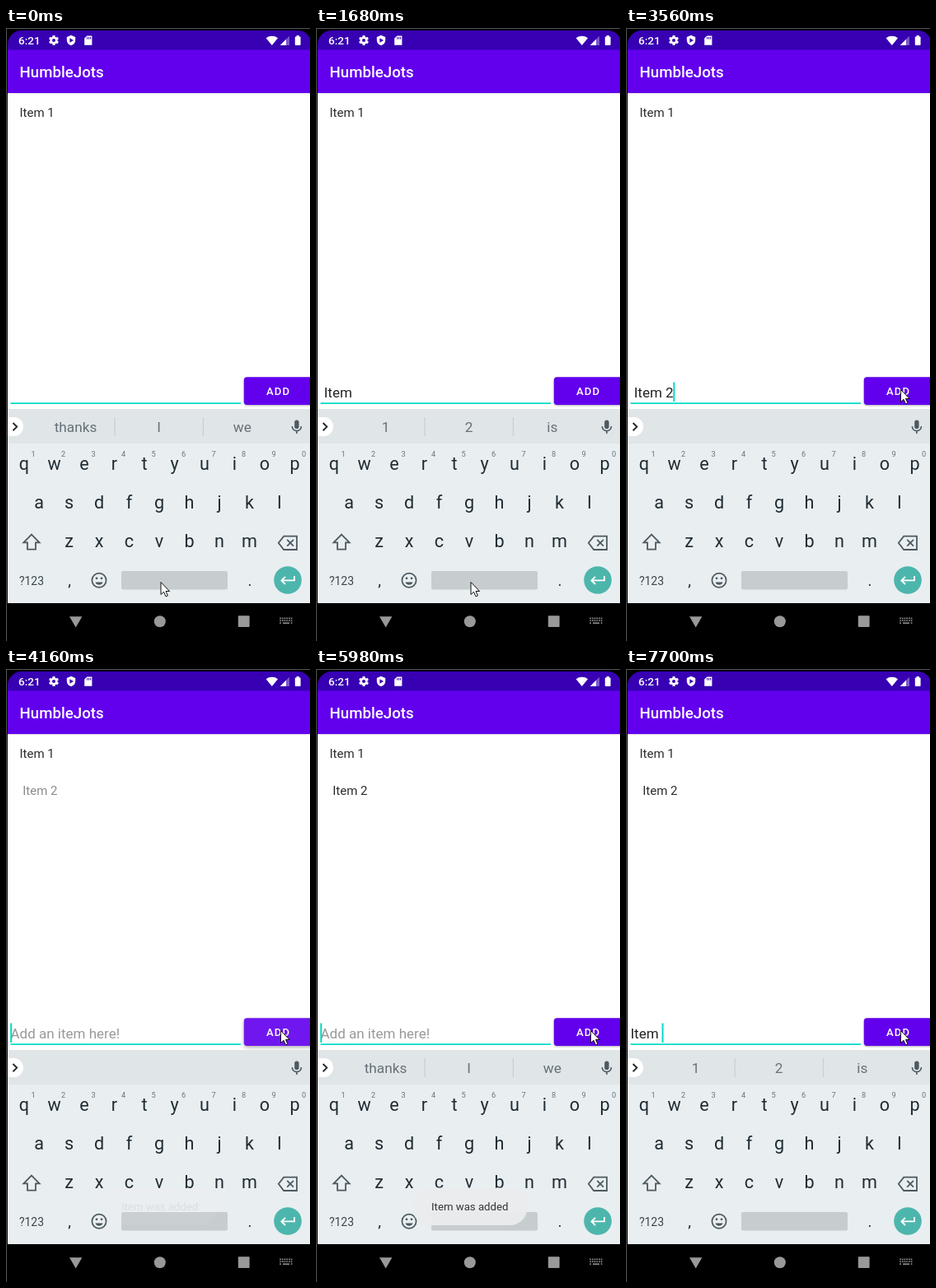
Animation of 369 by 745 pixels, one loop 8000 ms. Source, as an HTML page with a canvas:

```html
<!DOCTYPE html>
<html lang="en">
<head>
<meta charset="utf-8">
<title>To-do list</title>
<style>
html, body { margin: 0; width: 100%; height: 100%; overflow: hidden; background: #000; }
canvas { display: block; width: 100vw; height: 100vh; }
</style>
</head>
<body>
<canvas id="stage"></canvas>
<script>
const W = 369, H = 745, LOOP = 8000;
const canvas = document.getElementById('stage');
const c = canvas.getContext('2d');
const dpr = window.devicePixelRatio || 1;
canvas.width = W * dpr;
canvas.height = H * dpr;

const TEAL = '#03dac5', PURPLE = '#6200ee', INK = '#1f2d33', GREY = '#4c5a60';
const FONT = 'Roboto, sans-serif';

// Each track lists [start, value]; a value holds until the next start.
const HOME = ['thanks', 'I', 'we'];
const ON_I = ['I', "I'm", "I'll"];
const ON_IT = ['It', "It's", 'Its'];
const ON_ITE = ['Ite', 'Item', 'Items'];
const ON_ITEM = ['Item', 'Items', 'Itemized'];
const ON_SPACE = ['1', '2', 'is'];

const tracks = {
  typed: [[0, ' '], [560, ' I'], [830, ' It'], [980, ' Ite'], [1100, ' Item'], [1250, ' Item '],
    [2360, ' Item 2'], [4010, ''], [7010, 'I'], [7280, 'It'], [7430, 'Ite'], [7550, 'Item'], [7700, 'Item ']],
  words: [[0, HOME], [680, ON_I], [830, ON_IT], [980, ON_ITE], [1100, ON_ITEM], [1250, ON_SPACE],
    [2360, null], [4310, HOME], [7160, ON_I], [7280, ON_IT], [7430, ON_ITE], [7550, ON_ITEM], [7700, ON_SPACE]],
  caret: [[0, 0], [560, 1], [1680, 0], [2220, 1], [2890, 0], [3440, 1], [3860, 0], [4010, 1],
    [4580, 0], [4860, 1], [5450, 0], [5980, 1], [6340, 0], [6890, 1]],
  mouse: [[0, [187.5, 673]], [3170, [341, 496]], [3320, [339, 466]], [3440, [334, 443]], [3560, [333, 439]]],
  press: [[0, 0], [3860, 0.06], [4010, 0.12], [4160, 0.09], [4310, 0.04], [4430, 0]],
  item: [[0, 0], [4160, 0.55], [4310, 1]],
  toast: [[0, 0], [4160, 0.08], [4310, 0.6], [4430, 0.92], [4580, 1], [5980, 0.95], [6100, 0.7],
    [6220, 0.4], [6340, 0.15], [6490, 0]]
};

function at(track, t) {
  let value = track[0][1];
  for (const [start, v] of track) if (t >= start) value = v;
  return value;
}

function box(x, y, w, h, color, r = 0) {
  c.fillStyle = color;
  c.beginPath();
  c.roundRect(x, y, w, h, r);
  c.fill();
}

function disc(x, y, r, color) {
  c.fillStyle = color;
  c.beginPath();
  c.arc(x, y, r, 0, Math.PI * 2);
  c.fill();
}

function label(s, x, y, size, color, align = 'left', weight = 400) {
  c.font = `${weight} ${size}px ${FONT}`;
  c.textAlign = align;
  c.fillStyle = color;
  c.fillText(s, x, y);
}

function shape(d, color, line = 0) {
  const p = new Path2D(d);
  if (line) {
    c.strokeStyle = color;
    c.lineWidth = line;
    c.stroke(p);
  } else {
    c.fillStyle = color;
    c.fill(p);
  }
}

function gear(x, y) {
  c.save();
  c.translate(x, y);
  c.strokeStyle = '#fff';
  c.lineWidth = 3;
  for (let i = 0; i < 3; i++) {
    c.beginPath();
    c.moveTo(0, -6);
    c.lineTo(0, 6);
    c.stroke();
    c.rotate(Math.PI / 3);
  }
  disc(0, 0, 4.6, '#fff');
  disc(0, 0, 2, '#3700b3');
  c.restore();
}

function header() {
  c.save();
  c.beginPath();
  c.roundRect(2, 3, 369, 742, [17, 17, 0, 0]);
  c.clip();
  box(2, 3, W, 24, '#3700b3');
  box(2, 26.5, W, 52.5, PURPLE);
  c.restore();

  label('6:21', 15, 20, 13.6, '#fff', 'left', 500);
  gear(58, 15);
  shape('M79 8.8L84.2 11V15C84.2 18 82 20.4 79 21.3C76 20.4 73.8 18 73.8 15V11Z', '#fff');
  shape('M77.4 12.2L82 15L77.4 17.8Z', '#3700b3');
  shape('M98.4 9.4H104.4V20.8H95.2V12.6Z', '#fff');
  shape('M98.6 11V13.6M100.6 11V13.6M102.6 11V13.6', '#3700b3', 1);
  shape('M322.8 21L315.6 12.2C319.6 8.9 326 8.9 330 12.2Z', '#fff');
  shape('M344 9.8V21H332.8Z', 'rgba(255,255,255,.35)');
  shape('M340 13.8V21H332.8Z', '#fff');
  box(350.8, 10.4, 6.8, 10.6, '#fff', 1);
  box(352.6, 9, 3.2, 2, '#fff');

  label('HumbleJots', 16.5, 59.7, 18.7, '#fff', 'left', 500);
}

function list(alpha) {
  box(2, 79, W, 384, '#fff');
  box(2, 79, W, 1, 'rgba(0,0,0,.12)');
  label('Item 1', 16.5, 107.5, 15, '#2b2b2b');
  c.globalAlpha = alpha;
  label(' Item 2', 16.5, 152.7, 15, '#2b2b2b');
  c.globalAlpha = 1;
}

function field(typed, caret) {
  const x = 5.5, base = 448.8, size = 17;
  if (typed) {
    label(typed, x, base, size, '#222');
    if (/[a-z]$/i.test(typed)) {
      const lead = typed[0] === ' ' ? c.measureText(' ').width : 0;
      box(x + lead, 450, c.measureText(typed).width - lead, 1, '#333');
    }
  } else {
    label('Add an item here!', x, base, size, '#999');
  }
  if (caret) box(x + c.measureText(typed).width - 0.3, 430.5, 2, 23.5, TEAL);
  box(5.5, 455.2, 279.5, 1.9, TEAL);
}

function button(press) {
  c.save();
  c.shadowColor = 'rgba(0,0,0,.32)';
  c.shadowBlur = (press ? 4 : 2.5) * dpr;
  c.shadowOffsetY = (press ? 2 : 1) * dpr;
  box(288.8, 424.2, 84, 33.8, PURPLE, 3.7);
  c.restore();
  if (press) box(288.8, 424.2, 84, 33.8, `rgba(255,255,255,${press})`, 3.7);
  c.letterSpacing = '1.15px';
  label('ADD', 316, 446.2, 13.1, '#fff', 'left', 500);
  c.letterSpacing = '0px';
}

function suggestions(words) {
  box(2, 463, W, 42.5, '#e0e5e8');
  c.save();
  c.beginPath();
  c.rect(2, 463, W, 43);
  c.clip();
  box(-10, 473, 31, 23, '#fff', 11.5);
  c.restore();
  shape('M8.5 480L13.2 484.6L8.5 489.2', '#22292d', 1.9);
  if (words) {
    words.forEach((w, i) => label(w, [84.5, 185.5, 286.8][i], 490.8, 17.2, '#657177', 'center'));
    box(131.6, 473, 1, 23, '#c3c9cc');
    box(238.8, 473, 1, 23, '#c3c9cc');
  }
  box(350.2, 476.5, 5.4, 10.6, GREY, 2.7);
  shape('M347.4 484C347.4 491.5 358.4 491.5 358.4 484M352.9 489.6V493', GREY, 1.6);
}

function keyRow(keys, x, y) {
  [...keys].forEach((k, i) => label(k, x + i * 36.5, y, 21.6, INK, 'center'));
}

function keyboard() {
  box(2, 505, W, 194, '#e9eef1');
  keyRow('qwertyuiop', 22, 536.7);
  [...'1234567890'].forEach((n, i) => label(n, 33 + i * 36.5, 521.3, 9.2, '#68757b', 'center'));
  keyRow('asdfghjkl', 40, 584);
  keyRow('zxcvbnm', 76.5, 631.4);

  shape('M31 615.6L40.6 625.4H36V633.6H26V625.4H21.4Z', GREY, 1.8);
  shape('M330.8 625.8L337.2 617.6H353V634H337.2ZM341.2 621.8L349 629.6M349 621.8L341.2 629.6', GREY, 1.8);

  label('?123', 31, 676.5, 14, '#39474d', 'center');
  label(',', 77, 678, 19, INK, 'center');
  label('.', 296, 678, 19, INK, 'center');
  c.strokeStyle = GREY;
  c.lineWidth = 1.7;
  c.beginPath();
  c.arc(113, 671.3, 8.6, 0, Math.PI * 2);
  c.stroke();
  disc(110, 668.8, 1.4, GREY);
  disc(116, 668.8, 1.4, GREY);
  shape('M108.4 673.4C110 677.8 116 677.8 117.6 673.4Z', GREY);
  box(140, 660, 129, 22.6, '#c7cccf', 2);
  disc(342, 671, 16.8, '#4db6ac');
  shape('M350 666V671.4H335M339 666.8L334.4 671.4L339 676', '#fff', 1.9);
}

function navBar() {
  box(0, 699, W, 46, '#000');
  shape('M77 715.2H92.4L84.7 728.6Z', '#999');
  disc(186.8, 721.2, 7, '#999');
  box(281.8, 714.3, 13.8, 13.8, '#999', 1);
  for (let row = 0; row < 2; row++)
    for (let col = 0; col < 6; col++)
      box(332.2 + col * 2.7, 716.6 + row * 2.8, 1.7, 1.7, '#8c8c8c');
  box(332.2, 722.2, 1.7, 1.7, '#8c8c8c');
  box(336, 722.4, 8, 1.7, '#8c8c8c');
  box(345.7, 722.2, 1.7, 1.7, '#8c8c8c');
}

function toast(alpha) {
  if (!alpha) return;
  c.globalAlpha = alpha;
  box(117, 630.5, 139.5, 45.5, '#ebedee', 21);
  label('Item was added', 186.7, 658.2, 13.2, '#2a2a2a', 'center');
  c.globalAlpha = 1;
}

function pointer([x, y]) {
  c.save();
  c.translate(x + 0.5, y + 0.5);
  const d = 'M0 0V15L3.5 11.8L6 17.4L8.4 16.4L6 11H10.6Z';
  shape(d, '#fff');
  shape(d, '#111', 1);
  c.restore();
}

function draw(t) {
  const now = name => at(tracks[name], t);
  c.setTransform(dpr, 0, 0, dpr, 0, 0);
  box(0, 0, W, H, '#000');
  header();
  list(now('item'));
  field(now('typed'), now('caret'));
  button(now('press'));
  suggestions(now('words'));
  keyboard();
  navBar();
  box(0, 0, 1, H, '#555');
  box(0, 0, W, 1, '#555');
  toast(now('toast'));
  pointer(now('mouse'));
}

const begin = performance.now();
function tick() {
  draw((performance.now() - begin) % LOOP);
  requestAnimationFrame(tick);
}
tick();
</script>
</body>
</html>
```
